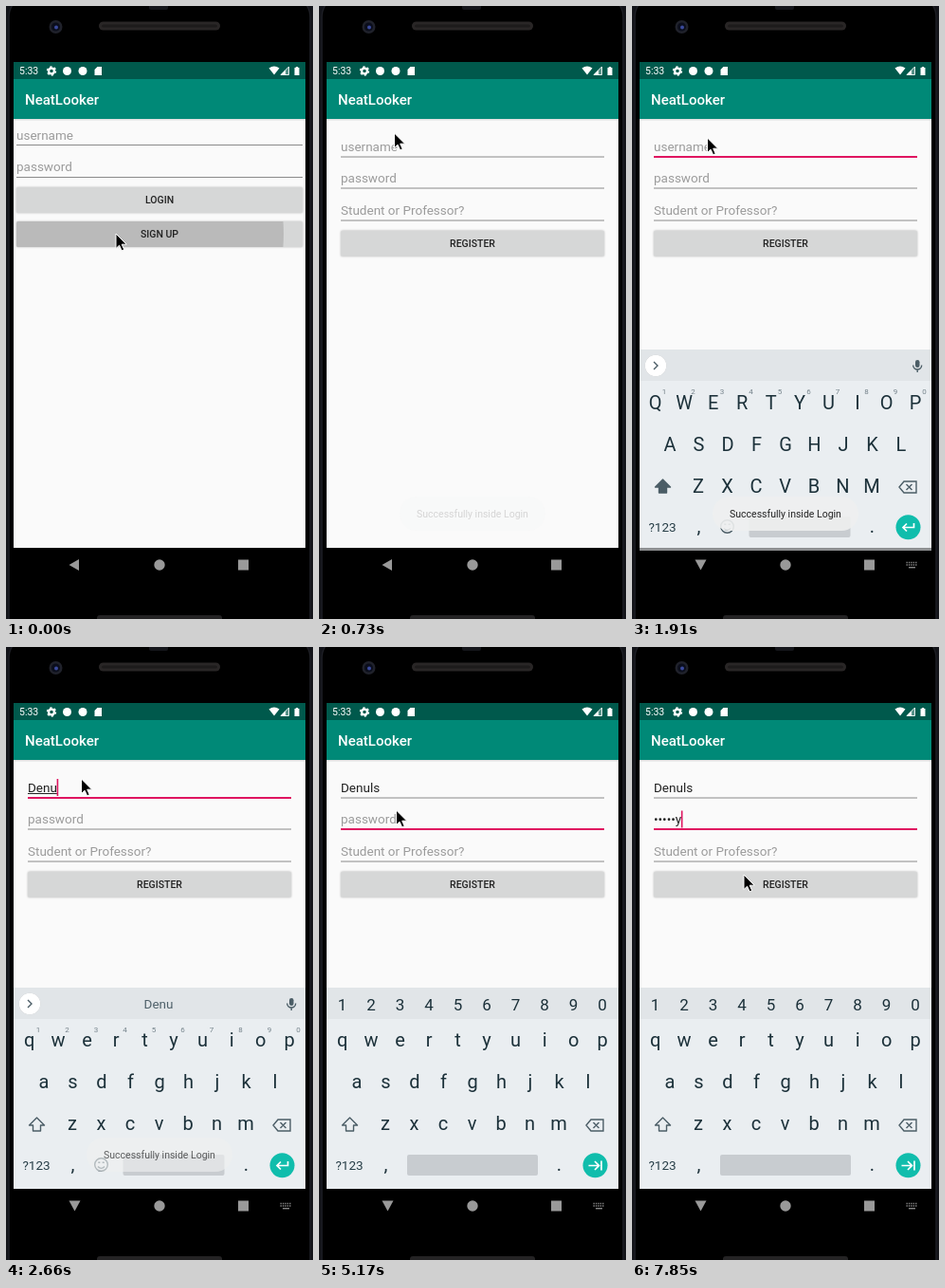
Write an HTML page that moves like this. It is 324x646 px and loops after 8000 ms.

```html
<!DOCTYPE html>
<html lang="en">
<head>
<meta charset="utf-8">
<title>Sign up on a phone</title>
<style>
  html, body { margin: 0; width: 100%; height: 100%; overflow: hidden; background: #000; }
  svg { display: block; width: 100vw; height: 100vh; }
  text { font-family: Roboto, "Noto Sans", sans-serif; font-size: 13.5px; fill: #222; white-space: pre; }
  .mid { text-anchor: middle; }
  .title { font-size: 15px; font-weight: 500; fill: #fff; }
  .hint { fill: #9b9b9b; }
  .hint.pressed { fill: #747474; }
  .label { font-size: 10.5px; font-weight: 500; }
  .small { font-size: 10.5px; }
  .key { font-size: 20px; fill: #1c313a; }
  .digit { font-size: 17px; fill: #1c313a; }
  .sup { font-size: 8px; fill: #74828a; }
  .btn { fill: #d6d7d7; filter: drop-shadow(0 .5px .8px rgba(0,0,0,.25)); }
  .line { fill: none; stroke: #8a8a8a; stroke-width: 1; }
  .line.on { stroke: #df1560; stroke-width: 2; }
  .icon { fill: none; stroke: #4b5d66; stroke-width: 1.4; }
</style>
</head>
<body>
<svg viewBox="0 0 324 646" preserveAspectRatio="none">
  <defs>
    <clipPath id="signClip"><rect x="11" y="227" width="302" height="27" rx="1.500"/></clipPath>
    <clipPath id="regClip"><rect x="23" y="237" width="278" height="27" rx="1.500"/></clipPath>
    <clipPath id="reveal"><rect id="revealBox" x="8" y="59" width="308" height="524"/></clipPath>
    <clipPath id="screen"><rect x="8" y="59" width="308" height="512"/></clipPath>
  </defs>

  <!-- phone body -->
  <rect width="324" height="646" fill="#121318"/>
  <rect x="3" y="-12" width="318" height="690" rx="24" fill="#000" stroke="#1d1e24" stroke-width="1.500"/>
  <rect x="151" y="-4" width="20" height="8" rx="2" fill="#15161b"/>
  <rect x="98" y="16.500" width="128" height="9" rx="4.500" fill="#292626"/>
  <rect x="101" y="19.500" width="122" height="3" rx="1.500" fill="#1d1b1b"/>
  <rect x="96" y="642" width="132" height="8" rx="3" fill="#242324"/>
  <circle cx="52.500" cy="22" r="7" fill="#20222b"/>
  <circle cx="52.500" cy="22" r="4.500" fill="#0b0e1c"/>
  <circle cx="53" cy="22.500" r="2" fill="#3a4a9c"/>

  <g clip-path="url(#screen)">
    <g id="loginPage"></g>
  </g>
  <g id="revealGroup" clip-path="url(#reveal)">
    <g id="registerPage"></g>
  </g>

  <!-- status bar -->
  <g fill="#fff">
    <text class="small" x="14" y="72" style="fill:#fff">5:33</text>
    <circle cx="48" cy="68.500" r="2.900" fill="none" stroke="#fff" stroke-width="2.200"/>
    <circle cx="48" cy="68.500" r="4.400" fill="none" stroke="#fff" stroke-width="1.600" stroke-dasharray="2.300"/>
    <circle cx="64.500" cy="68.500" r="4.500"/>
    <circle cx="81" cy="68.500" r="4.500"/>
    <path d="M96.500 64h4.500v9h-7.500v-6z"/>
    <path d="M277.500 65.500q5.500-4 11 0l-5.500 7z"/>
    <path d="M298 64.500v8h-8z" fill-opacity=".35"/>
    <path d="M290 72.500l5-5v5z"/>
    <path d="M298.500 64v8.500h-8.500z" fill="none" stroke="#fff" stroke-width=".9"/>
    <path d="M304.500 65h1.300v-1h2.400v1h1.300v8h-5z"/>
  </g>

  <g id="keyboard"></g>

  <!-- navigation bar -->
  <rect x="8" y="571" width="308" height="24" fill-opacity=".4"/>
  <g fill="#999">
    <path id="back" d="M66.500 589l10.500-6v12z"/>
    <circle cx="162" cy="589" r="5.700"/>
    <rect x="245" y="583.500" width="11" height="11"/>
    <g id="imeIcon" stroke="#858585" stroke-width="1.400" stroke-dasharray="1.400 1">
      <path d="M289.500 586.500h12M289.500 589h12"/>
      <path d="M292 591.700h7" stroke-dasharray="none"/>
    </g>
  </g>

  <g id="toast">
    <rect x="85" y="517" width="154" height="36" rx="18" fill="#eff0f0" fill-opacity=".9"/>
    <text class="small mid" x="162" y="539">Successfully inside Login</text>
  </g>

  <path id="pointer" d="M0 0v15.500l3.600-3.300 2.500 5.600 2.600-1.100-2.500-5.500h5z"
    fill="#000" stroke="#fff" stroke-width="1" stroke-linejoin="round"/>
</svg>

<script>
const LOOP = 8000;
const APP = 'NeatLooker';
const USER = 'Denuls';
const PASS = 'tilkey';
const $ = id => document.getElementById(id);

const text = (cls, x, y, s, id = '') => `<text id="${id}" class="${cls}" x="${x}" y="${y}">${s}</text>`;
const group = (id, body) => `<g id="${id}">${body}</g>`;
const line = (id, x1, x2, y) => `<path id="${id}" class="line" d="M${x1} ${y}H${x2}"/>`;

const chrome = `
  <rect x="8" y="59" width="308" height="512" fill="#fafafa"/>
  <rect x="8" y="119" width="308" height="1.5" fill="#000" opacity=".1"/>
  <rect x="8" y="77" width="308" height="42" fill="#008977"/>
  <rect x="8" y="59" width="308" height="18" fill="#00594c"/>
  ${text('title', 20, 104, APP)}`;

const button = (x, y, w, label, rippleId = '', clip = '') => `
  <rect class="btn" x="${x}" y="${y}" width="${w}" height="27" rx="1.5"/>
  ${rippleId && `<g clip-path="url(#${clip})"><circle id="${rippleId}" fill="#000" opacity=".135"/></g>`}
  ${text('label mid', 162, y + 17.3, label)}`;

$('loginPage').innerHTML = chrome
  + text('hint', 11, 140.5, 'username') + line('', 11, 313, 146.5)
  + text('hint', 11, 174.2, 'password') + line('', 11, 313, 180.5)
  + button(11, 191, 302, 'LOGIN')
  + button(11, 227, 302, 'SIGN UP', 'signRipple', 'signClip');

$('registerPage').innerHTML = chrome
  + text('hint', 23, 152.5, 'username', 'userHint') + text('', 23, 152.5, '', 'user')
  + '<path id="compose" stroke="#222"/>' + line('userLine', 23, 301, 159)
  + text('hint', 23, 186, 'password', 'passHint') + text('', 23, 186, '', 'pass')
  + line('passLine', 23, 301, 192)
  + text('hint', 23, 220, 'Student or Professor?') + line('', 23, 301, 226)
  + button(23, 236.7, 278, 'REGISTER', 'regRipple', 'regClip')
  + '<rect id="caret" width="1.6" height="18" fill="#df1560"/>';

const STEP = 30.5;
const row = (keys, x, y, cls = 'key') =>
  [...keys].map((k, i) => text(cls + ' mid', x + i * STEP, y, k)).join('');
const letters = (up, y) => ['qwertyuiop', 'asdfghjkl', 'zxcvbnm']
  .map((k, i) => row(up ? k.toUpperCase() : k, [24.6, 40, 70][i], y + 44 * i)).join('');
const shift = fill =>
  `<path class="icon" style="fill:${fill}" d="M32.500 496l8 8h-4v6h-8v-6h-4z" stroke-linejoin="round"/>`;

$('keyboard').innerHTML = `
  <rect x="8" y="359" width="308" height="212" fill="#eaeef1"/>
  <rect x="8" y="359" width="308" height="33" fill="#e1e5e8"/>`
  + group('upper', letters(true, 422.4) + shift('#4b5d66'))
  + group('lower', letters(false, 421) + shift('none'))
  + group('textKeys', `
    <circle cx="25" cy="376" r="11.300" fill="#fff" style="filter:drop-shadow(0 .5px .7px rgba(0,0,0,.25))"/>
    <path class="icon" d="M23 372l4 4-4 4"/>
    <rect x="299" y="370" width="4.500" height="8" rx="2.250" fill="#4b5d66"/>
    <path class="icon" d="M296.700 375.500a4.500 4.500 0 0 0 9 0M301.200 380v3"/>
    ${row('1234567890', 34, 405.5, 'sup')}
    <circle class="icon" cx="100.500" cy="545.500" r="6.800"/>
    <path class="icon" d="M97 547.500q3.500 3.800 7 0M97.300 543.300h2M101.700 543.300h2"/>
    <rect x="123.500" y="535" width="107" height="22" rx="2" fill="#c8ccd0"/>`)
  + group('passKeys', row('1234567890', 24.6, 383, 'digit')
    + '<rect x="93" y="535" width="138" height="22" rx="2" fill="#c8ccd0"/>')
  + '<text id="suggest" class="mid" x="161" y="381" style="fill:#50626b"></text>'
  + `<path class="icon" d="M287 498h13v12h-13l-5-6zM289.500 501l6 6M295.500 501l-6 6"/>
    <text class="mid" x="32" y="550.5" style="fill:#263d46">?123</text>
    ${text('key mid', 70.5, 552, ',')}${text('key mid', 253.5, 552, '.')}
    <circle cx="291.500" cy="546.300" r="13" fill="#10bdac"/>
    <g fill="none" stroke="#fff" stroke-width="1.700">
      <path id="enter" d="M297.500 542v4.500h-11M290 542.500l-4 4 4 4"/>
      <path id="next" d="M284.500 546.500h10M291 542l4.500 4.500-4.500 4.500M298 541.500v10"/>
    </g>`;

// Held value: the last entry whose time has passed.
const at = (t, steps) => steps.reduce((v, [from, next]) => t >= from ? next : v, steps[0][1]);
const show = (id, on) => { $(id).style.display = on ? '' : 'none'; };
const move = (id, x, y) => $(id).setAttribute('transform', `translate(${x} ${y})`);
const write = (id, s) => { if ($(id).textContent !== s) $(id).textContent = s; };
const ripple = (id, x, y, r) => {
  for (const [k, v] of Object.entries({ cx: x, cy: y, r })) $(id).setAttribute(k, v);
};

const pointerPath = [[0, [116, 240]], [290, [113, 232]], [440, [101, 196]], [580, [86, 156]],
  [730, [79.5, 134]], [880, [79.5, 138]], [1030, [79.5, 139]], [3240, [81, 158]],
  [3390, [81.5, 172]], [6810, [84, 179]], [6960, [96, 197]], [7100, [105.5, 211]],
  [7250, [114, 230]], [7400, [118, 240]]];
const userTyping = [[0, 0], [2210, 1], [2360, 2], [2510, 3], [2660, 4], [2800, 5], [2950, 6]];
const passTyping = [[0, 0], [5620, 1], [5770, 2], [5910, 4], [6060, 5], [6360, 6]];
const caretBlink = [[0, 0], [2210, 1], [4130, 0], [4730, 1], [5170, 0], [5620, 1], [6810, 0], [7400, 1]];
const toastFade = [[0, 0], [580, .06], [730, .17], [880, .6], [1030, .9], [1170, 1],
  [2660, .7], [2800, .3], [2950, 0]];

function render(t) {
  // opening the second page
  const top = at(t, [[0, 583], [290, 350], [440, 150], [580, 59]]);
  show('revealGroup', t >= 290);
  $('revealBox').setAttribute('y', top);
  $('revealBox').setAttribute('height', 583 - top);
  move('registerPage', 0, at(t, [[0, 12], [440, 4], [580, 1], [730, 0]]));
  move('loginPage', 0, at(t, [[0, 0], [290, -3], [440, -8]]));
  ripple('signRipple', 116, 240, t < 140 ? 177 : 320);
  ripple('regRipple', 118, 250, t >= 7550 && t < 7850 ? 177 : 0);

  // fields
  const inPass = t >= 3390;
  const masked = t >= 3680;
  const user = USER.slice(0, at(t, userTyping));
  const n = at(t, passTyping);
  write('user', user);
  write('pass', n ? '•'.repeat(n - 1) + PASS[n - 1] : '');
  show('userHint', !user);
  show('passHint', !n);
  $('passHint').classList.toggle('pressed', inPass && !masked);
  $('userLine').classList.toggle('on', t >= 1320 && !masked);
  $('passLine').classList.toggle('on', inPass);
  const userEnd = 23 + $('user').getComputedTextLength();
  $('compose').setAttribute('d', user && !masked ? `M23 154.500H${userEnd}` : '');
  const caretX = inPass ? 23 + $('pass').getComputedTextLength() : userEnd;
  $('caret').setAttribute('x', caretX - .3);
  $('caret').setAttribute('y', inPass ? 172.5 : 139);
  show('caret', at(t, caretBlink));

  // keyboard
  show('keyboard', t >= 1620);
  $('keyboard').style.opacity = at(t, [[0, .2], [1770, .65], [1910, 1]]);
  move('keyboard', 0, at(t, [[0, 18], [1770, 9], [1910, 3], [2060, 0]]));
  show('upper', !user);
  show('lower', user);
  show('textKeys', !masked);
  show('passKeys', masked);
  show('enter', !masked);
  show('next', masked);
  write('suggest', masked ? '' : user);
  show('imeIcon', t >= 1620);
  $('back').setAttribute('d', t >= 1620 ? 'M66.500 583.500h12l-6 11z' : 'M66.500 589l10.500-6v12z');

  $('toast').style.opacity = at(t, toastFade);
  move('pointer', ...at(t, pointerPath));
}

const start = performance.now();
function tick() {
  render((performance.now() - start) % LOOP);
  requestAnimationFrame(tick);
}
tick();
</script>
</body>
</html>
```
